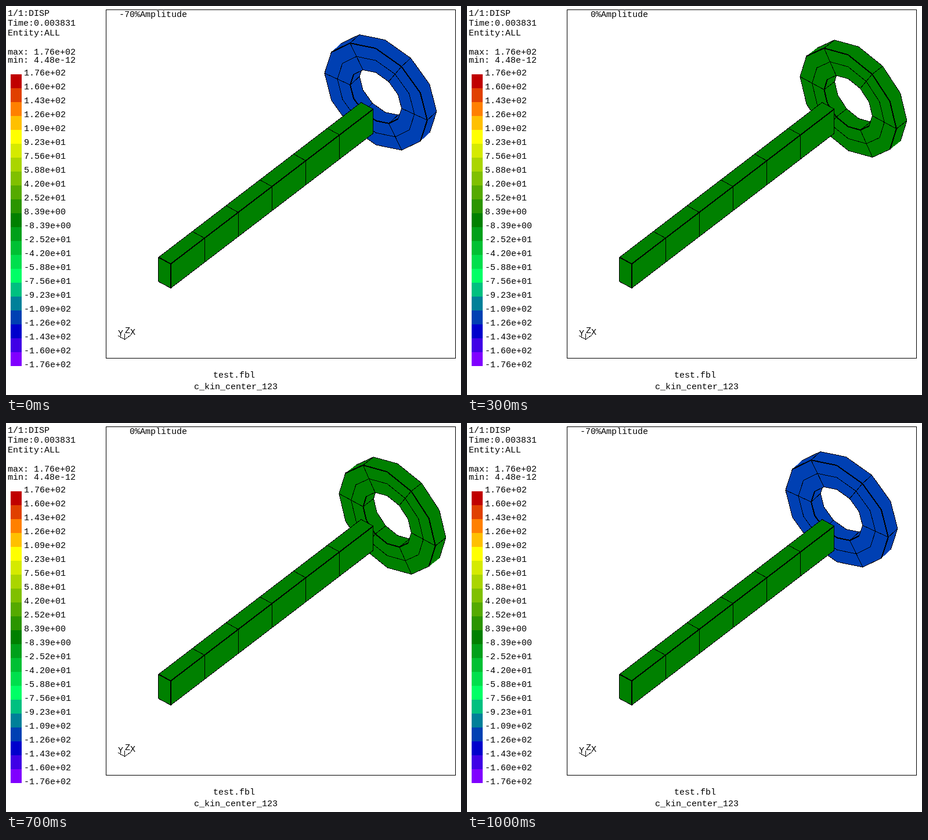
An HTML page for the animation above (1100 ms loop, 784x672 px).

```html
<!DOCTYPE html>
<html lang="en">
<head>
<meta charset="utf-8">
<title>Mode shape</title>
<style>
  html, body { margin: 0; width: 100%; height: 100%; overflow: hidden; background: #fff; }
  svg { display: block; shape-rendering: crispEdges; }
  text { font: 15px "Liberation Mono", "Courier New", monospace; fill: #000; }
  .line { fill: none; stroke: #000; stroke-width: 1; }
  .bold { fill: none; stroke: #000; stroke-width: 2; }
</style>
</head>
<body>
<svg width="784" height="672" viewBox="0 0 784 672">
  <clipPath id="view"><rect x="172" y="6" width="602" height="602"/></clipPath>
  <g id="legend"></g>
  <g clip-path="url(#view)">
    <g id="ring" transform="translate(-.1 .1)"></g>
    <g id="beam" transform="translate(-.1 .1)"></g>
  </g>
  <rect class="line" x="172.5" y="6.5" width="602" height="602"/>
  <path class="line" d="M204.5 566V576L193 569.5M204.5 576L214.5 569"/>
  <text id="amp" x="312" y="19" text-anchor="end"></text>
</svg>
<script>
const NS = "http://www.w3.org/2000/svg";
const $ = id => document.getElementById(id);

function add(parent, tag, attrs, text = "") {
  const el = document.createElementNS(NS, tag);
  for (const k in attrs) el.setAttribute(k, attrs[k]);
  el.textContent = text;
  parent.append(el);
  return el;
}

const path = (pts, close) => "M" + pts.map(p => p.join(" ")).join("L") + (close ? "Z" : "");

// Legend and labels
const palette = ("c00000 e04000 ff8000 ffc000 ffff00 d5ea00 aad500 80c000 55aa00 2b9500 008000 " +
  "00a01a 00c033 00df4d 00ff66 00c080 008099 0040b3 0000cc 4000e6 8000ff").split(" ").map(c => "#" + c);
const peak = 176.29;
const legend = $("legend");

function sci(v) {
  const [m, e] = v.toExponential(2).split("e");
  return m + "e" + e[0] + e.slice(1).padStart(2, "0");
}

palette.forEach((fill, i) => add(legend, "rect", { x: 8, y: 118 + 24 * i, width: 19, height: 24, fill }));
for (let i = 0; i < 22; i++) {
  add(legend, "text", { x: 31, y: 120 + 24 * i }, sci(peak * (1 - 2 * i / 21)));
}
[
  [3, 17, "1/1:DISP"], [3, 34, "Time:0.003831"], [3, 51, "Entity:ALL"],
  [3, 84, "max: 1.76e+02"], [3, 98, "min: 4.48e-12"],
  [357, 642, "test.fbl"], [324, 662, "c_kin_center_123"],
  [193, 570, "Y"], [205, 565, "Z"], [214, 568, "X"]
].forEach(([x, y, s]) => add(legend, "text", { x, y }, s));

// Beam of six elements
const beam = $("beam");
const along = (x, y, k) => [x + 349 * k / 6, y - 267.5 * k / 6];
const back = k => along(263, 434, k);
const front = k => along(284, 445.5, k);
const foot = k => along(284, 487.3, k);
add(beam, "path", {
  d: path([back(0), back(6), front(6), foot(6), foot(0), [263, 476]], true),
  fill: palette[10], stroke: "#000"
});
for (let k = 1; k < 6; k++) add(beam, "path", { class: "line", d: path([back(k), front(k), foot(k)]) });
add(beam, "path", { class: "bold", d: path([front(6), front(0), foot(0)]) });
add(beam, "path", { class: "bold", d: path([back(0), front(0)]) });

// Ring: centre, two radii and depth, each as [x, y, dx, dy] per unit amplitude
const shape = {
  c: [657, 167, 27.6, 14.85],
  u: [-41.75, -94.25, 3.9, -2.5],
  v: [71.75, -2.4, -6.7, 5.9],
  w: [18, -14, 2.8, 0.9]
};
const ring = $("ring");
const walls = add(ring, "path", {});
const innerLines = add(ring, "path", { class: "line" });
const face = add(ring, "path", { "fill-rule": "evenodd" });
const thin = add(ring, "path", { class: "line" });
const bold = add(ring, "path", { class: "bold" });

function drawRing(amp) {
  const at = ([x, y, dx, dy]) => [x + dx * amp, y + dy * amp];
  const [c, u, v, w] = [shape.c, shape.u, shape.v, shape.w].map(at);
  const circle = r => Array.from({ length: 12 }, (_, i) => {
    const a = i * Math.PI / 6, s = r * Math.sin(a), t = r * Math.cos(a);
    return [c[0] + t * u[0] + s * v[0], c[1] + t * u[1] + s * v[1]];
  });
  const deep = p => [p[0] + w[0], p[1] + w[1]];
  const outer = circle(1), mid = circle(0.75), inner = circle(0.5);
  const out = { walls: "", inner: "", thin: path(mid, true) + path(outer, true) + path(inner, true), bold: "" };

  // The outer wall shows on one side, the bore on the other
  const faces = outer.map((p, i) => {
    const q = outer[(i + 1) % 12];
    return (q[0] - p[0]) * w[1] - (q[1] - p[1]) * w[0] < 0;
  });
  for (let i = 0; i < 12; i++) {
    const j = (i + 1) % 12, prev = (i + 11) % 12;
    const pts = faces[i] ? outer : inner, key = faces[i] ? "thin" : "inner";
    const p = pts[i], q = pts[j];
    out.walls += path([p, q, deep(q), deep(p)], true);
    out[key] += path([deep(p), deep(q)]);
    out.bold += path([p, q]);
    if (i % 2) continue;
    if (faces[i] === faces[prev]) out[key] += path([p, deep(p)]);
    out.thin += path([outer[i], inner[i]]);
  }
  walls.setAttribute("d", out.walls);
  innerLines.setAttribute("d", out.inner);
  face.setAttribute("d", path(outer, true) + path(inner, true));
  thin.setAttribute("d", out.thin);
  bold.setAttribute("d", out.bold);

  const band = Math.min(20, Math.floor((1 - amp) / 2 * 21));
  walls.setAttribute("fill", palette[band]);
  face.setAttribute("fill", palette[band]);
  $("amp").textContent = Math.trunc(amp * 100) + "%Amplitude";
}

// Eleven steps of a sine, eight to a period
const step = 100, count = 11;
let shown = -1;

function tick() {
  const n = Math.floor(performance.now() / step) % count;
  if (n !== shown) {
    shown = n;
    const amp = Math.sin((n + 5) * Math.PI / 4);
    drawRing(Math.round(amp * 1e4) / 1e4 || 0);
  }
  requestAnimationFrame(tick);
}
tick();
</script>
</body>
</html>
```
